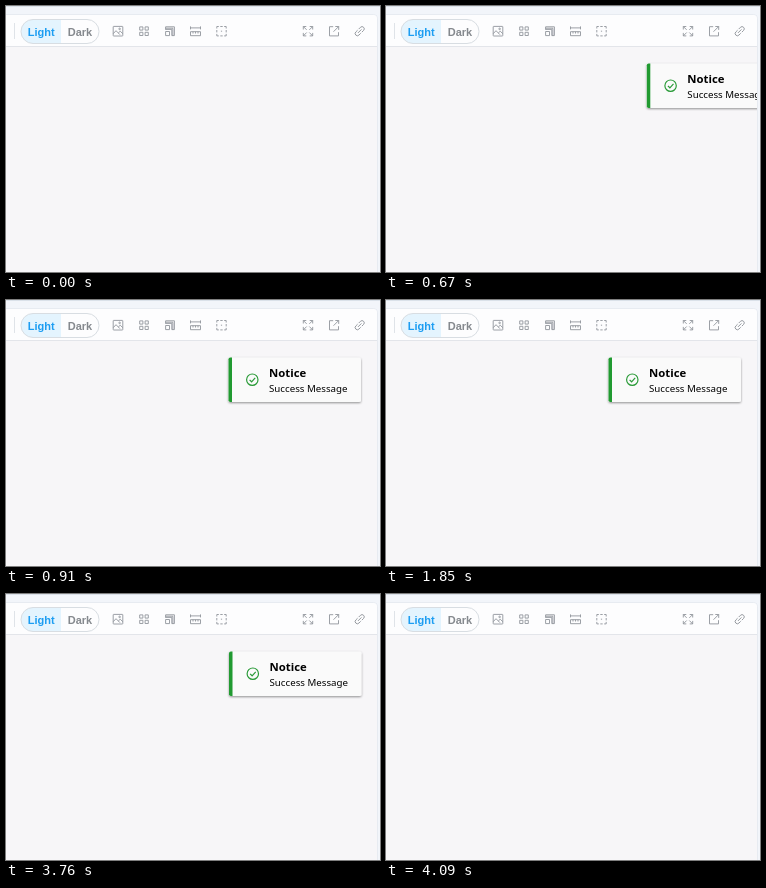
Write an HTML page that moves like this. It is 374 by 266 pixels and loops after 4120 ms.

```html
<!DOCTYPE html>
<html lang="en">
<head>
<meta charset="utf-8">
<title>Toast notice</title>
<style>
  html, body { margin: 0; width: 100%; height: 100%; overflow: hidden; background: #f2f5fa; }
  svg { display: block; width: 374px; height: 266px; }
  .tab { font: bold 11px "Liberation Sans", Arial, sans-serif; }
  .toast { font-family: "Noto Sans", sans-serif; fill: #000; }
  .icons { fill: none; stroke: #91969c; stroke-width: .9; }
</style>
</head>
<body>
<svg viewBox="0 0 374 266">
  <defs>
    <clipPath id="panel"><path d="M0 9H367.500Q371 9 371 12.500V266H0Z"/></clipPath>
    <filter id="shadow" x="-10%" y="-20%" width="120%" height="150%">
      <feDropShadow dx="0" dy="1" stdDeviation="1" flood-opacity=".42"/>
    </filter>
  </defs>

  <rect width="374" height="266" fill="#f2f5fa"/>
  <path d="M0 .5H374" stroke="#dae1e9"/>
  <path d="M0 8.500H367.500Q371.500 8.500 371.500 12.500V266" fill="none" stroke="#e7ebf1"/>
  <g clip-path="url(#panel)">
    <rect y="9" width="371" height="32" fill="#fdfdfe"/>
    <rect y="41" width="371" height="225" fill="#f7f6f8"/>
    <path d="M0 40.500H371" stroke="#e3e5ea"/>
  </g>

  <path d="M8.500 17V33" stroke="#dfe3e8"/>
  <path d="M55 13.500H27a12 12 0 0 0 0 24H55Z" fill="#e4f4fe"/>
  <rect x="15" y="13.500" width="78" height="24" rx="12" fill="none" stroke="#d8dde2"/>
  <text class="tab" x="21.800" y="29.500" fill="#1c9df2">Light</text>
  <text class="tab" x="61.700" y="29.500" fill="#85898e">Dark</text>

  <g class="icons">
    <g transform="translate(112 25.200)">
      <rect x="-4.800" y="-4.800" width="9.600" height="9.600" rx=".5"/>
      <path d="M-4.800 2.500L-2 -.5L2 3.500M.3 1.800L2.200 0L4.800 2.500"/>
      <circle cx="1.600" cy="-2.300" r=".8"/>
    </g>
    <g transform="translate(138 25.200)">
      <path d="M-4.300-4.300h3.200v3.200h-3.200zM1.100-4.300h3.200v3.200h-3.200zM-4.300 1.100h3.200v3.200h-3.200zM1.100 1.100h3.200v3.200h-3.200z"/>
    </g>
    <g transform="translate(164 25.200)">
      <path d="M-4.400-4.400H4.400V4.400H1.800M-4.400-4.400V-1.500M1.800 4.400V-1.800H-4.400M-4.400 .3H-.5V4.400H-4.400ZM2.900-2.900V4.400M-4.400-3H3"/>
    </g>
    <g transform="translate(189.500 25.200)">
      <path d="M-5-4.800V-1.800M5-4.800V-1.800M-5-3.300H5M-5 .5H5V4.500H-5ZM-2.500 .5V2.300M0 .5V2.300M2.500 .5V2.300"/>
    </g>
    <g transform="translate(215.500 25.200)">
      <path d="M-4.700-2.700V-4.700H-2.700M2.700-4.700H4.700V-2.700M4.700 2.700V4.700H2.700M-2.700 4.700H-4.700V2.700M-1.200-4.700H1.200M-1.200 4.700H1.200M-4.700-1.200V1.200M4.700-1.200V1.200M-.6 0H.6"/>
    </g>
    <g transform="translate(302 25.200)">
      <path d="M-4.700-1.700V-4.700H-1.700M1.700-4.700H4.700V-1.700M4.700 1.700V4.700H1.700M-1.700 4.700H-4.700V1.700M-4.700-4.700L-1.300-1.300M4.700-4.700L1.300-1.300M4.700 4.700L1.300 1.300M-4.700 4.700L-1.300 1.300"/>
    </g>
    <g transform="translate(328 25.200)">
      <path d="M-.8-4.500H-4.500V4.700H4.500V1M1.300-4.700H4.700V-1.300M4.700-4.700L-.5 .5"/>
    </g>
    <g transform="translate(353.700 25.200) rotate(-45)">
      <path d="M-.8-2.200H-3.300a2.200 2.200 0 0 0 0 4.400H-.8M.8-2.200H3.300a2.200 2.200 0 0 1 0 4.400H.8M-2.500 0H2.500"/>
    </g>
  </g>

  <g clip-path="url(#panel)">
    <g id="toast" class="toast">
      <rect x="222.500" y="57.500" width="132.500" height="44.500" rx="1.800" fill="#fafafa" filter="url(#shadow)"/>
      <path d="M226 57.500H224.300Q222.500 57.500 222.500 59.300V100.200Q222.500 102 224.300 102H226Z" fill="#219a31"/>
      <g fill="none" stroke="#2a9b38" stroke-width="1.200">
        <circle cx="246.300" cy="79.700" r="5.700"/>
        <path d="M243.600 79.900L245.600 81.800L249.200 77.900"/>
      </g>
      <text x="263" y="77" font-size="11.350" font-weight="700">Notice</text>
      <text x="263" y="91.800" font-size="9.720">Success Message</text>
    </g>
  </g>
</svg>
<script>
  const LOOP = 4120, STEP = 30, TRAVEL = 152;
  const ENTER = { from: 550, to: 910, begin: 530, span: 380 };
  const LEAVE = { from: 3760, to: 4090, begin: 3740, span: 345 };
  const toast = document.getElementById('toast');

  // Motion advances in whole steps of 30 ms.
  function progress(t, phase) {
    const stepped = phase.from + Math.floor((t - phase.from) / STEP) * STEP;
    return Math.min(1, (stepped - phase.begin) / phase.span);
  }

  function offset(t) {
    if (t < ENTER.from || t >= LEAVE.to) return null;
    if (t < ENTER.to) return TRAVEL * (1 - progress(t, ENTER)) ** 3;
    if (t < LEAVE.from) return 0;
    return TRAVEL * progress(t, LEAVE) ** 2;
  }

  function draw(now) {
    const x = offset(now % LOOP);
    toast.style.display = x === null ? 'none' : '';
    if (x !== null) toast.setAttribute('transform', `translate(${x.toFixed(2)} 0)`);
  }

  const start = performance.now();
  function tick() {
    draw(performance.now() - start);
    requestAnimationFrame(tick);
  }
  tick();
</script>
</body>
</html>
```
